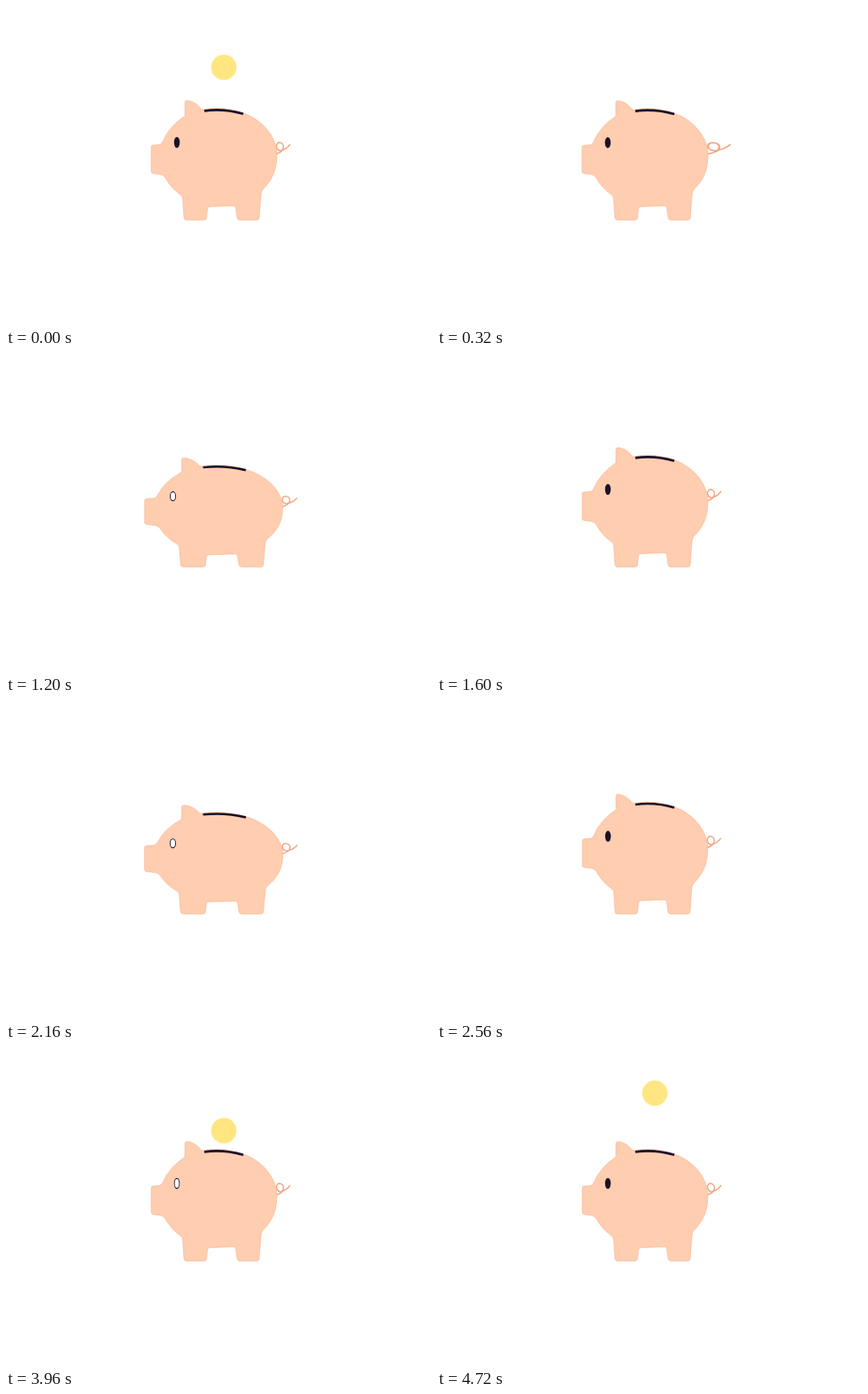
An HTML page that plays this animation: 480 px wide and 360 px high, repeating every 4.76 s.

```html
<!DOCTYPE html>
<html lang="en">
<head>
<meta charset="utf-8">
<title>Piggy bank</title>
<style>
  html, body { margin: 0; width: 100%; height: 100%; overflow: hidden; background: #fff; }
  svg { display: block; width: 100%; height: 100%; }
</style>
</head>
<body>
<svg viewBox="0 0 480 360">
  <circle id="coin" cx="246" r="14.3" fill="#ffe680"/>
  <g id="pig">
    <path id="tail" d="M305 167C316 164 315 154 308.500 154C303.500 155 305 164 311 163Q317 161.500 320.500 156.500"
      fill="none" stroke="#f0a582" stroke-width="1.4" stroke-linecap="round"/>
    <path fill="#ffcdaf" stroke="#f4ab84" stroke-width=".5" d="M202 124V109Q202 106.500 205 106.700Q214 107.500 221 117
      Q245 112.500 268 120.800C291 129 306 149 306 168C306 186 300 197 290 207Q288.500 209 288 212
      L286 239Q285.700 241.500 283 241.500H264Q261.500 241.500 261 239L259.500 228Q259 225.500 257 225.500
      L230 226.500Q227.800 226.500 227.500 229L226.500 239Q226 241.500 224 241.500H204Q201.500 241.500 201 239
      L199.500 217Q199 214 197 213Q186 205 180 194Q178 190.500 174 190L166 189Q164 188.700 164 186.500
      V159Q164 157 166 157L173 156.500Q176 156 177 153Q184 136 202 124Z"/>
    <path d="M224 118.300Q246 115.200 268 121.800" fill="none" stroke="#1b1028" stroke-width="2.7"/>
    <ellipse cx="193" cy="154" rx="3.2" ry="6.200" fill="#1b1028"/>
    <ellipse id="glint" cx="193" cy="154" rx="2.4" ry="4.900" fill="#fff"/>
  </g>
</svg>
<script>
const LOOP = 4760, STEP = 40;
const drops = [-160, 840, 1825, 2740, 3755, 4600];
// Squash amount over the time since a coin began to fall
const squashKeys = [[240, 0], [340, 1], [580, -0.55], [760, 0]];
const [coin, pig, tail, glint] = ['coin', 'pig', 'tail', 'glint'].map(id => document.getElementById(id));
const clamp = v => Math.min(1, Math.max(0, v));
const ease = v => (1 - Math.cos(Math.PI * clamp(v))) / 2;

function squash(t) {
  let value = 0;
  for (let i = 1; i < squashKeys.length; i++) {
    const [t0, a] = squashKeys[i - 1], [t1, b] = squashKeys[i];
    value += (b - a) * ease((t - t0) / (t1 - t0));
  }
  return value;
}

const scaleAt = (x, y, sx, sy) => `translate(${x} ${y}) scale(${sx} ${sy}) translate(${-x} ${-y})`;

function draw(now) {
  const time = Math.floor((now % LOOP) / STEP) * STEP;
  const t = time - drops.filter(d => d <= time).pop();
  const y = 30 + 2.45 * (t / 40) ** 2;
  coin.setAttribute('cy', Math.min(y, 160));
  coin.setAttribute('opacity', y > 160 ? 0 : clamp((t - 20) / 80));

  const k = squash(t);
  pig.setAttribute('transform', scaleAt(239, 241.5, 1 + 0.1 * k, 1 - 0.09 * k));
  const stretch = Math.sin(Math.PI * clamp((t - 400) / 320)) ** 2;
  tail.setAttribute('transform', scaleAt(305, 165, 1 + 1.3 * stretch, 1));
  glint.setAttribute('opacity', t > 180 && t < 480 ? 1 : 0);
}

const begin = performance.now();
function tick() {
  draw(performance.now() - begin);
  requestAnimationFrame(tick);
}
tick();
</script>
</body>
</html>
```
